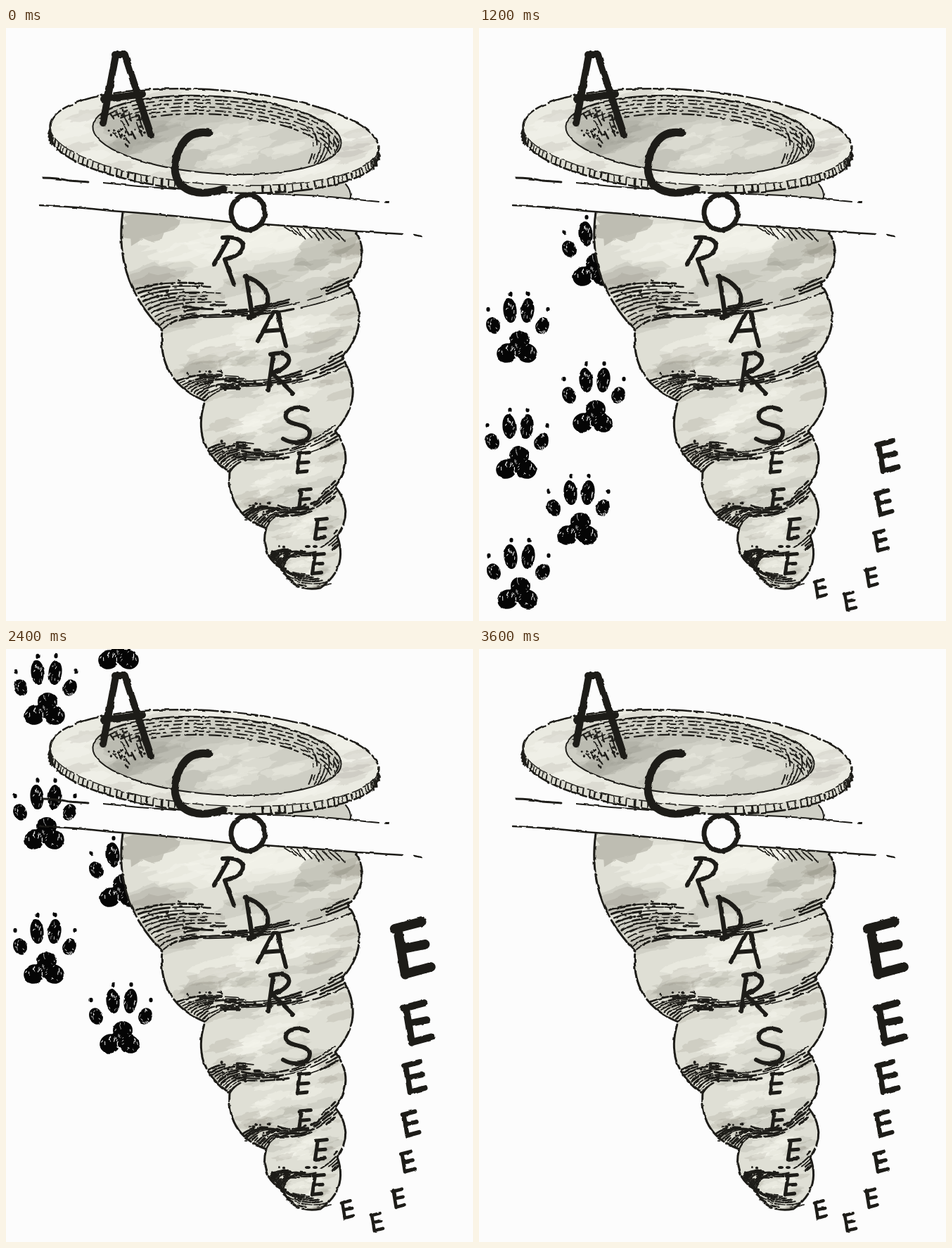
An HTML page with a canvas that plays this animation: 664 by 843 pixels, repeating every 3800 ms.

```html
<!DOCTYPE html>
<html lang="es">
<head>
<meta charset="utf-8">
<title>Acordarse</title>
<style>
  html, body { margin: 0; width: 100%; height: 100%; overflow: hidden; background: #fcfcfc; }
  canvas { display: block; filter: url(#rough); }
  svg { position: absolute; width: 0; height: 0; }
</style>
</head>
<body>
<canvas id="stage" width="664" height="843"></canvas>
<svg>
  <filter id="rough" x="0" y="0" width="100%" height="100%" color-interpolation-filters="sRGB">
    <feTurbulence type="fractalNoise" baseFrequency=".08" numOctaves="2" seed="4"/>
    <feDisplacementMap in="SourceGraphic" scale="3" xChannelSelector="R" yChannelSelector="G"/>
  </filter>
</svg>
<script>
const W = 664, H = 843, STEP = 200, LOOP = 3800;
const INK = '#1d1c18', PAPER = '#fcfcfc', BLACK = '#050505', TAU = Math.PI * 2;
const stage = document.getElementById('stage').getContext('2d');

let seed = 11;
const rand = (lo = 0, hi = 1) => {
  seed = (seed * 16807) % 2147483647;
  return lo + (hi - lo) * seed / 2147483647;
};
const mix = (p, q, t) => p.map((v, i) => v + (q[i] - v) * t);
const shade = alpha => `rgba(112,111,97,${alpha})`;
const light = alpha => `rgba(243,243,235,${alpha})`;

function layer(w, h, paint) {
  const canvas = document.createElement('canvas');
  canvas.width = w;
  canvas.height = h;
  const c = canvas.getContext('2d');
  c.lineCap = c.lineJoin = 'round';
  c.fillStyle = c.strokeStyle = INK;
  paint(c);
  return canvas;
}

function line(c, d, width, dash = []) {
  c.lineWidth = width;
  c.setLineDash(dash);
  c.stroke(new Path2D(d));
  c.setLineDash([]);
}

function oval(x, y, rx, ry, tilt = 0, from = 0, to = TAU) {
  const path = new Path2D();
  path.ellipse(x, y, rx, ry, tilt, from, to);
  return path;
}

function fill(c, path, color) {
  c.fillStyle = color;
  c.fill(path);
}

// Fills a shape and lays watercolour patches inside it
function wash(c, path, color, patches) {
  c.save();
  fill(c, path, color);
  c.clip(path);
  patches();
  c.restore();
}

function blob(c, x, y, rx, ry, color) {
  const path = new Path2D();
  for (let a = 0; a < TAU; a += TAU / 22) {
    const r = rand(.72, 1.2), px = Math.cos(a) * rx * r;
    path.lineTo(x + px, y + Math.sin(a) * ry * r - px * .2);
  }
  fill(c, path, color);
}

function bezier(points, t) {
  while (points.length > 1) points = points.slice(1).map((p, i) => mix(points[i], p, t));
  return points[0];
}

// Broken pen strokes filling the space between two curves
function hatch(c, from, to, rows, keep, width) {
  for (let row = 0; row < rows; row++) {
    const curve = from.map((p, i) => mix(p, to[i], row / (rows - 1)));
    for (let u = rand(0, .04); u < 1;) {
      const end = Math.min(1, u + rand(.08, .24));
      if (rand() < keep(u)) {
        c.lineWidth = width * rand(.6, 1.35);
        c.beginPath();
        for (let i = 0; i <= 5; i++) c.lineTo(...bezier(curve, u + (end - u) * i / 5));
        c.stroke();
      }
      u = end + rand(.015, .05);
    }
  }
}

function dots(c, x, y, rx, ry, n) {
  for (let i = 0; i < n; i++) {
    fill(c, oval(x + rand(-rx, rx), y + rand(-ry, ry), rand(1, 2.8), rand(.8, 2.2)), INK);
  }
}

// Where the coils of the shell meet, down each side to the shared tip
const leftKnots = [[166, 262], [222, 429], [283, 530], [318, 631], [370, 711], [393, 769], [447, 796]];
const rightKnots = [[498, 290], [486, 363], [478, 468], [468, 573], [468, 652], [471, 722], [447, 796]];

function bulge([x1, y1], [x2, y2]) {
  const length = Math.hypot(x2 - x1, y2 - y1), k = Math.min(44, length * .38) / length;
  return [(x1 + x2) / 2 - (y2 - y1) * k, (y1 + y2) / 2 + (x2 - x1) * k];
}

function drawBody(c) {
  const knots = [...leftKnots, ...rightKnots.slice(0, -1).reverse()];
  const shape = new Path2D();
  knots.forEach((p, i) => i ? shape.quadraticCurveTo(...bulge(knots[i - 1], p), ...p) : shape.moveTo(...p));

  wash(c, shape, '#dfdfd5', () => {
    for (let i = 0; i < 6; i++) {
      const top = [leftKnots[i], rightKnots[i]], bottom = [leftKnots[i + 1], rightKnots[i + 1]];
      const w = top[1][0] - top[0][0];
      const patch = (u, v, size, color) => {
        const [x, y] = mix(mix(...top, u), mix(...bottom, u), v);
        blob(c, x, y, w * size, w * size * .3, color);
      };
      for (let n = 0; n < 9; n++) patch(rand(.2, .8), rand(.1, .65), rand(.1, .2), light(.45));
      for (let n = 0; n < 8; n++) patch(rand(0, 1), rand(.5, 1.1), rand(.08, .2), shade(.13));
      for (let n = 0; n < 4; n++) patch(rand(-.05, .22), rand(.35, 1), rand(.1, .18), shade(.15));
      for (let n = 0; n < 4; n++) patch(rand(.84, 1.05), rand(.1, .8), rand(.06, .14), shade(.15));
    }
    blob(c, 200, 282, 45, 22, shade(.3));
    blob(c, 455, 310, 45, 28, shade(.22));
  });

  c.lineWidth = 3;
  c.setLineDash([38, 3, 14, 4, 52, 3, 9, 5]);
  c.stroke(shape);
  c.setLineDash([]);

  for (let i = 1; i < 6; i++) {
    const low = leftKnots[i], end = rightKnots[i];
    const high = bezier([leftKnots[i - 1], bulge(leftKnots[i - 1], low), low], .62);
    const w = end[0] - high[0], mid = (low[1] + end[1]) / 2;
    const from = ([x, y], u, dy) => [x + w * u, y + dy];
    hatch(c,
      [high, from(high, .1, -10), from(high, .2, -12), from(high, .36, -8)],
      [low, from(low, .06, -18), from(low, .18, -22), from(low, .38, -22)],
      11, u => 1 - u * .6, 2.4);
    hatch(c,
      [from(low, .1, -34), from(low, .32, -20), [high[0] + w * .75, mid - 4], from(end, 0, -8)],
      [from(low, .08, -18), from(low, .35, -16), [high[0] + w * .78, mid + 10], from(end, .02, 12)],
      5, u => u > .7 ? .95 : .6, 2.5);
    dots(c, ...from(high, .17, 0), w * .13, 15, 20);
  }
  hatch(c, [[373, 742], [390, 775], [425, 776]], [[398, 782], [430, 800], [462, 790]], 7, () => .8, 2.1);
  for (let x = 396; x < 470; x += 9) {
    line(c, `M${x} ${283 + (x - 396) * .08} l${rand(9, 17)} ${rand(10, 17)}`, 1.8);
  }
}

function drawDish(c) {
  const rim = (y, from, to) => oval(296, y, 234, 67, .07, from, to);
  const hollow = oval(300, 152, 177, 55, .07);
  const broken = [34, 4, 14, 5];

  fill(c, new Path2D('M372 234 Q440 232 483 220 L491 243 Z'), '#cfcfc5');
  line(c, 'M483 222 Q491 231 490 242', 2);

  // Milled edge
  fill(c, rim(166), '#dcdcd2');
  c.lineWidth = 2.6;
  c.setLineDash(broken);
  c.stroke(rim(166, -.05, Math.PI + .08));
  c.setLineDash([]);
  for (let a = .04; a < 3.12; a += rand(.035, .06)) {
    if (a > 1.3 && a < 1.75) continue;
    const x = 296 + 234 * Math.cos(a) - 4.6 * Math.sin(a);
    const y = 156 + 66 * Math.sin(a) + 16.4 * Math.cos(a);
    line(c, `M${x} ${y + 1} l${Math.cos(a) * 2} ${rand(6, 11)}`, rand(1.4, 3));
  }

  wash(c, rim(155), '#eaeae1', () => {
    for (let a = 0; a < TAU; a += rand(.15, .4)) {
      blob(c, 298 + Math.cos(a) * 207, 154 + Math.sin(a) * 62, 30, 8, rand() < .5 ? shade(.12) : light(.6));
    }
  });
  c.lineWidth = 2.5;
  c.setLineDash(broken);
  c.stroke(rim(155, Math.PI - .1, TAU + .1));
  c.lineWidth = 1.4;
  c.stroke(rim(155, 0, Math.PI));
  c.setLineDash([]);

  wash(c, hollow, '#cecec4', () => {
    for (let i = 0; i < 14; i++) blob(c, rand(130, 290), rand(115, 195), 38, 13, shade(.1));
    for (let i = 0; i < 9; i++) blob(c, rand(290, 420), rand(145, 195), 32, 10, light(.3));
    for (let k = 0; k < 6; k++) {
      c.lineWidth = rand(1.5, 2.6);
      c.setLineDash([rand(10, 20), 5, rand(4, 10), 8]);
      c.stroke(oval(300, 152 + k * 5, 176 - k * 2.5, 54, .07, Math.PI * (1.1 + k * .03), Math.PI * (1.95 + k * .012)));
    }
    c.setLineDash([]);
    hatch(c, [[132, 128], [148, 140], [168, 172]], [[190, 108], [186, 125], [198, 150]], 8, () => .5, 2);
    dots(c, 170, 140, 32, 20, 26);
    hatch(c, [[425, 138], [446, 160], [430, 193]], [[474, 158], [474, 175], [455, 192]], 7, () => .6, 1.8);
  });
  c.lineWidth = 2;
  c.stroke(hollow);
}

function drawBand(c) {
  line(c, 'M53 213 Q72 213 90 217 L117 219', 2.8);
  line(c, 'M139 220 Q190 226 242 229 M372 236 Q440 237 490 243 L530 247 M539 248 L544 248', 2);
  line(c, 'M48 252 Q100 254 150 260 Q240 266 320 276 Q420 282 500 289 L564 293 M580 294 L591 296', 2.4);
}

function drawLetters(c) {
  line(c, 'M156 39 L138 135 M139 101 L194 94 M155 38 L169 38 L206 152', 10);
  line(c, 'M288 149 C257 144 242 170 240 200 C242 232 272 241 309 229', 11);
  const o = oval(344, 262, 24, 25, .1);
  fill(c, o, PAPER);
  c.lineWidth = 7;
  c.stroke(o);
  line(c, 'M317 299 L296 336 M308 298 C346 294 346 322 311 329 L324 364', 6);
  line(c, 'M342 354 L350 409 M340 353 C378 366 386 400 345 412', 6.5);
  line(c, 'M358 445 L380 404 L386 404 L398 452 M366 431 L393 429', 6);
  line(c, 'M380 464 L373 515 M376 464 C411 455 411 483 378 490 L408 519', 6);
  line(c, 'M429 543 C412 535 395 543 398 555 C403 566 432 562 432 575 C431 592 408 592 394 584', 6);
  for (const [x, y] of [[422, 618], [424, 670], [447, 712], [443, 762]]) letterE(c, x, y, 34, -.2);
  for (const x of [429, 440]) fill(c, oval(x, 737, 4, 2), INK);
}

// lean > 0 tips the spine to the right going down
function letterE(c, x, y, height, lean) {
  const pen = height * .15, w = height * .76 - pen, h = height - pen;
  const at = (u, v) => `${x + (u - .5) * w} ${y + (v - .5) * h} `;
  const spine = v => .23 + lean * (v - .5);
  const arm = (v, reach, rise) =>
    `M${at(spine(v) - (v < .5 ? .1 : 0), v)}L${at(reach + lean * (v - .5) * 1.2, v - rise)}`;
  const rise = lean > 0 ? .13 : .05;
  line(c, `M${at(spine(0), rise)}L${at(spine(1), .98)}` +
    arm(rise, .84, rise) + arm(.51, .84, rise * .7) + arm(.97, .88, rise), pen);
}

function drawPaw(c) {
  const scratched = (x, y, rx, ry, tilt) => {
    fill(c, oval(x, y, rx, ry, tilt), BLACK);
    for (let i = 0; i < 11; i++) {
      const a = rand(0, TAU), r = rand(.45, .9);
      line(c, `M${x + Math.cos(a) * rx * r} ${y + Math.sin(a) * ry * r} l${rand(-2, 2)} ${rand(1, 5)}`, rand(.5, 1.1));
    }
  };
  c.strokeStyle = PAPER;
  fill(c, oval(46, 82, 14, 12), BLACK);
  scratched(49, 70, 14, 13, 0);
  for (const side of [-1, 1]) {
    scratched(46 + side * 35, 50, 9.5, 12, side * .4);
    scratched(47.5 + side * 12.5, 28.5, 9.5, 17.5, side * .1);
    scratched(45 + side * 14, 89, 15, 13.5, side * .4);
    fill(c, oval(46.5 + side * 42.5, 27, 2.6, 3.2), BLACK);
    fill(c, oval(48.5 + side * 12.5, 5, 2.6, 3.2), BLACK);
  }
  line(c, 'M45 103 Q45 97 42 93', 1.8);
}

const art = layer(W, H, c => [drawBody, drawDish, drawBand, drawLetters].forEach(draw => draw(c)));
const paw = layer(96, 106, drawPaw);

// Corners of the paw prints and centres of the trailing letters, in order of appearance
const prints = [[10, 723], [95, 632], [8, 538], [117, 472], [9, 373], [117, 264], [9, 182], [10, 5], [115, -74]];
const trail = [[485, 797], [527, 815], [558, 781], [571, 729], [575, 675], [580, 609], [584, 532], [577, 426]];

function render(step) {
  stage.fillStyle = PAPER;
  stage.fillRect(0, 0, W, H);
  prints.forEach((corner, i) => {
    if (step > i && step < i + 10) stage.drawImage(paw, ...corner);
  });
  stage.drawImage(art, 0, 0);
  stage.strokeStyle = INK;
  stage.lineCap = stage.lineJoin = 'round';
  trail.slice(0, step).forEach(([x, y], i) => letterE(stage, x, y, 30 + 60 * (i / 7) ** 3, .2));
}

let shown = -1;
function tick() {
  const step = Math.floor(performance.now() % LOOP / STEP);
  if (step !== shown) render(shown = step);
  requestAnimationFrame(tick);
}
tick();
</script>
</body>
</html>
```
